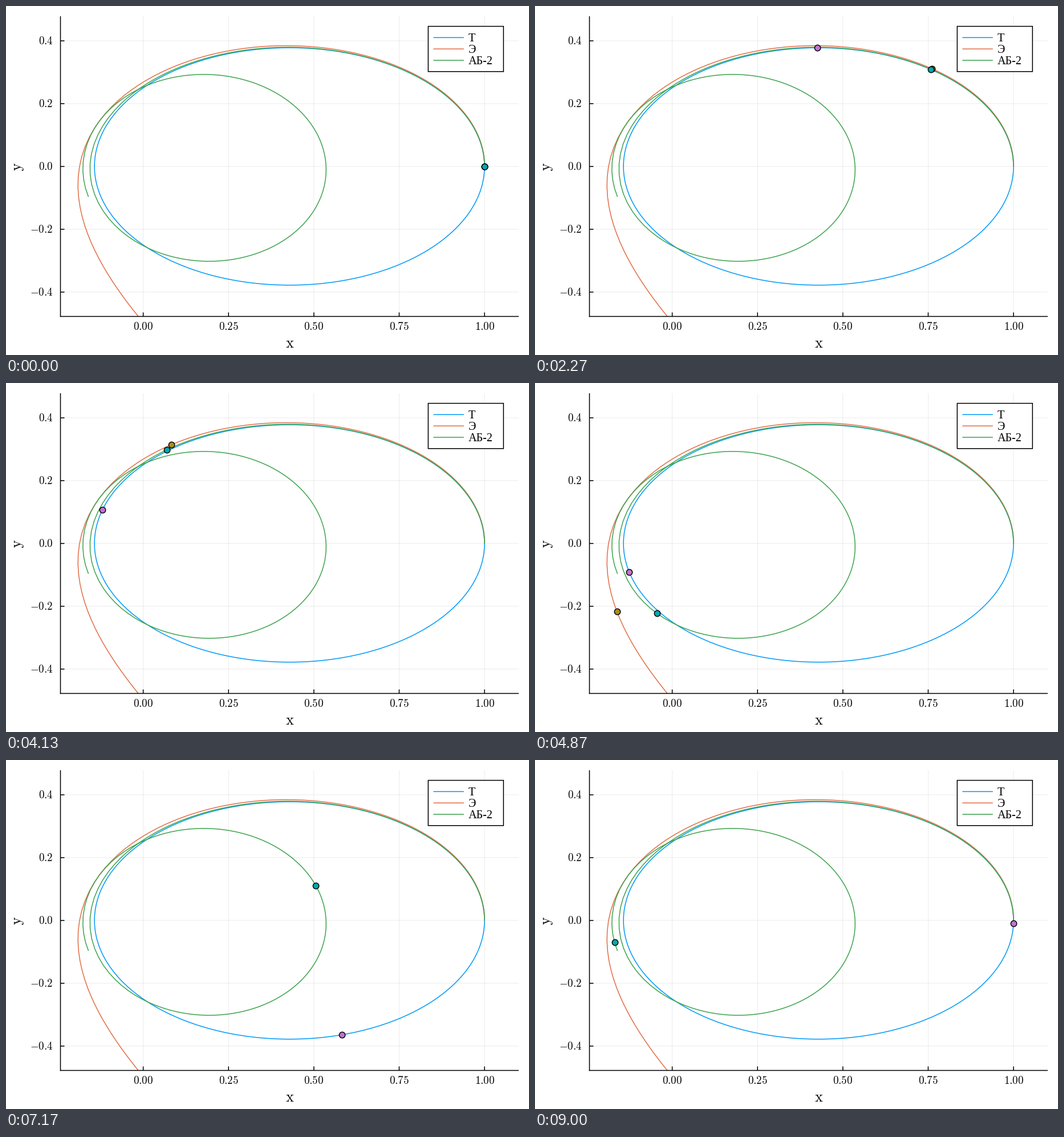
Animation, 917 px wide and 611 px high, one loop 9030 ms. Source, as a matplotlib script:

```python
import numpy as np
import matplotlib.pyplot as plt
from matplotlib.animation import FuncAnimation
from matplotlib.patches import Rectangle

W, H, DPI = 917, 611, 100
PX = 72 / DPI            # points per pixel
FRAMES, LOOP = 271, 9030
DT = 0.01
LW = 1.53 * PX
LEFT, RIGHT, TOP, BOTTOM = 95.5, 899, 18, 543.5

plt.rcParams["mathtext.fontset"] = "cm"


def to_px(x, y):
    return 240.6 + 598.4 * np.asarray(x), 280.9 - 549.8 * np.asarray(y)


def exact():
    """Kepler ellipse with the attracting body in its right-hand origin."""
    a, e = 4 / 7, 0.75
    s = np.linspace(0, 2 * np.pi, FRAMES + 1)
    return a * e + a * np.cos(s), a * np.sqrt(1 - e * e) * np.sin(s)


def integrate(two_step):
    """Euler steps, or two-step Adams-Bashforth with the radius held at r_n."""
    pos, vel = np.array([1.0, 0.0]), np.array([0.0, 0.5])
    last_pos, last_vel = pos, vel
    path = [pos]
    for n in range(FRAMES):
        k = 0.5 if two_step and n else 0.0
        p = (1 + k) * pos - k * last_pos
        v = (1 + k) * vel - k * last_vel
        acc = -p / np.hypot(*pos) ** 3
        last_pos, last_vel = pos, vel
        pos, vel = pos + DT * v, vel + DT * acc
        path.append(pos)
    return np.array(path).T


fig = plt.figure(figsize=(W / DPI, H / DPI), dpi=DPI, facecolor="white")
ax = fig.add_axes([0, 0, 1, 1])
ax.set_xlim(0, W)
ax.set_ylim(H, 0)
ax.axis("off")


def line(x, y, color="black", width=LW, **kw):
    return ax.plot(x, y, color=color, lw=width, solid_capstyle="butt",
                   snap=False, **kw)[0]


def label(x, y, s, size, **kw):
    ax.text(x, y, s, fontsize=size * PX, color="black", **kw)


# grid, ticks and axes
for v in (0, 0.25, 0.5, 0.75, 1):
    x = to_px(v, 0)[0]
    line([x, x], [TOP, BOTTOM], width=0.76 * PX, alpha=0.1, zorder=1)
    line([x, x], [BOTTOM, BOTTOM - 7], zorder=4)
    label(x, 566.8, f"${v:.2f}$", 19, ha="center", va="baseline")
for v in (-0.4, -0.2, 0, 0.2, 0.4):
    y = to_px(0, v)[1]
    line([LEFT, RIGHT], [y, y], width=0.76 * PX, alpha=0.1, zorder=1)
    line([LEFT, LEFT + 7], [y, y], zorder=4)
    label(82.5, y + 6.3, f"${v:.1f}$", 19, ha="right", va="baseline")
line([LEFT, LEFT], [TOP, BOTTOM + 0.76], zorder=4)
line([LEFT - 0.76, RIGHT], [BOTTOM, BOTTOM], zorder=4)
label(497.3, 598, r"$\mathrm{x}$", 26.1, ha="center", va="baseline")
label(21, 281, r"$\mathrm{y}$", 26.1, ha="center", va="center", rotation=90)

# orbits and their markers
area = Rectangle((LEFT, TOP), RIGHT - LEFT, BOTTOM - TOP,
                 transform=ax.transData)
orbits = [
    ("Т", exact(), "#009afa", "#c271d2"),
    ("Э", integrate(False), "#e36f47", "#ac8e18"),
    ("АБ-2", integrate(True), "#3ea44e", "#00aaae"),
]

ax.add_patch(Rectangle((740.3, 35.6), 132, 79.2, fc="white", ec="black",
                       lw=LW, snap=False, joinstyle="miter", zorder=6))
tracks, dots = [], []
for i, (name, path, color, fill) in enumerate(orbits):
    px, py = to_px(*path)
    line(px, py, color, zorder=3).set_clip_path(area)
    dot = line([px[0]], [py[0]], marker="o", ms=10.4 * PX, mfc=fill,
               mec="black", mew=1.45 * PX, zorder=5)
    dot.set_clip_path(area)
    tracks.append((px, py))
    dots.append(dot)
    y = 55.3 + 19.9 * i
    line([749.3, 802.8], [y, y], color, zorder=7)
    label(811, y + 6.5, name, 20.2, family="Liberation Serif",
          va="baseline", zorder=7)


def update(n):
    for dot, (px, py) in zip(dots, tracks):
        dot.set_data([px[n]], [py[n]])
    return dots


anim = FuncAnimation(fig, update, frames=FRAMES, interval=LOOP / FRAMES,
                     repeat=True, repeat_delay=0, blit=False)
plt.show()
```
